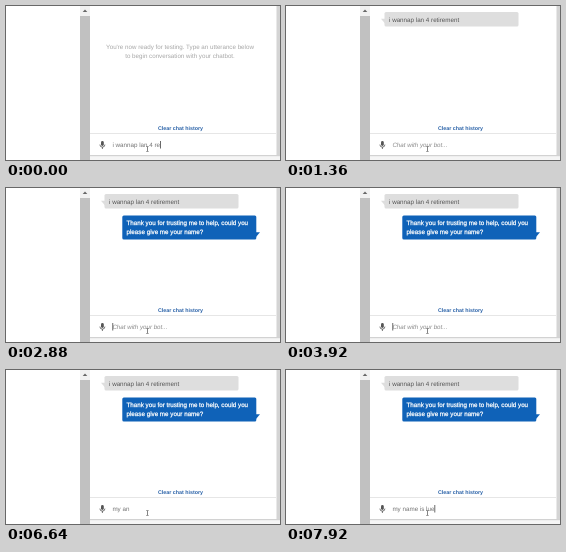
These frames come from a looping animation (274 px wide and 154 px high, 8000 ms). An HTML page with a canvas:

```html
<!DOCTYPE html>
<html lang="en">
<head>
<meta charset="utf-8">
<title>Chat test panel</title>
<style>
html, body { margin: 0; width: 100%; height: 100%; overflow: hidden; background: #fff; }
canvas { display: block; width: 274px; height: 154px; }
</style>
</head>
<body>
<canvas id="stage"></canvas>
<script>
const W = 274, H = 154, LOOP = 8000;
const canvas = document.getElementById('stage');
const ctx = canvas.getContext('2d');
const dpr = window.devicePixelRatio || 1;
canvas.width = W * dpr;
canvas.height = H * dpr;

const FAMILY = '"Liberation Sans", Arial, sans-serif';
const HINT = 'Chat with your bot...';
const FIRST = 'i wannap lan 4 retirement';
const LEFT = 106.4;

// [time, text in the input]; an empty string shows the hint
const typing = [
  [0, 'i wannap lan 4 re'], [320, 'i wannap lan 4 ret'],
  [400, 'i wannap lan 4 retir'], [480, 'i wannap lan 4 retire'],
  [640, 'i wannap lan 4 retirem'], [720, 'i wannap lan 4 retireme'],
  [800, 'i wannap lan 4 retiremen'], [880, FIRST], [1200, ''],
  [5840, 'm'], [5920, 'my'], [6000, 'my '], [6080, 'my a'], [6160, 'my an'],
  [6800, 'my a'], [6880, 'my '], [7040, 'my na'], [7200, 'my nam'],
  [7280, 'my name'], [7360, 'my name '], [7440, 'my name i'],
  [7600, 'my name is'], [7680, 'my name is l'],
  [7840, 'my name is lu'], [7920, 'my name is lue']
];

// [time, caret visible]
const blink = [
  [0, 1], [160, 0], [320, 1], [1200, 0], [1840, 1], [2400, 0], [2880, 1],
  [3440, 0], [3920, 1], [4320, 0], [4480, 1], [5520, 0], [5840, 1],
  [6640, 0], [6800, 1]
];

function at(list, t) {
  let value = list[0][1];
  for (const [start, v] of list) if (t >= start) value = v;
  return value;
}

function rect(x, y, w, h, color) {
  ctx.fillStyle = color;
  ctx.fillRect(x, y, w, h);
}

function poly(color, ...pts) {
  ctx.fillStyle = color;
  ctx.beginPath();
  pts.forEach(([x, y]) => ctx.lineTo(x, y));
  ctx.fill();
}

function text(str, x, y, color, { size = 6.26, style = '', align = 'left', weight = 0 } = {}) {
  ctx.font = `${style} ${size}px ${FAMILY}`;
  ctx.textRendering = 'geometricPrecision';
  ctx.textAlign = align;
  ctx.fillStyle = color;
  ctx.fillText(str, x, y);
  if (weight) {
    ctx.strokeStyle = color;
    ctx.lineWidth = weight;
    ctx.strokeText(str, x, y);
  }
  return ctx.measureText(str).width;
}

function bubble(x, y, w, h, color) {
  ctx.fillStyle = color;
  ctx.beginPath();
  ctx.roundRect(x, y, w, h, 1.5);
  ctx.fill();
}

function frame() {
  rect(0, 0, W, H, '#fff');
  // scrollbars
  rect(74, 0, 10, H, '#f1f1f1');
  rect(74, 10, 10, H - 10, '#c1c1c1');
  poly('#666', [76.7, 6], [79, 3.6], [81.3, 6]);
  rect(270.5, 0, 3.5, 150, '#d4d4d4');
  // input row borders
  rect(84, 127, 186, 1, '#e6e6e6');
  rect(84, 149, 190, 1.5, '#d2d2d2');
  rect(84, 150.5, 190, 3.5, '#f5f5f5');
}

function mic() {
  ctx.fillStyle = '#555';
  ctx.beginPath();
  ctx.roundRect(95, 135, 2.8, 5, 1.4);
  ctx.fill();
  ctx.strokeStyle = '#555';
  ctx.lineWidth = 0.8;
  ctx.beginPath();
  ctx.arc(96.4, 138.6, 2.5, 0, Math.PI);
  ctx.moveTo(96.4, 141);
  ctx.lineTo(96.4, 143);
  ctx.stroke();
}

function pointer() {
  rect(141, 140.5, 0.8, 5, '#666');
  rect(140, 140, 2.8, 0.6, '#777');
  rect(140, 145.3, 2.8, 0.6, '#777');
}

function intro() {
  const opt = { size: 6.22, align: 'center' };
  text("You're now ready for testing. Type an utterance below", 174, 43, '#a6a6a6', opt);
  text('to begin conversation with your chatbot.', 174, 51.8, '#a6a6a6', opt);
}

function question(alpha) {
  ctx.globalAlpha = alpha;
  bubble(98.5, 6, 134, 14.5, '#dedede');
  poly('#dedede', [95, 12.8], [99, 12.8], [99, 17.5]);
  text(FIRST, 103, 15.6, '#555');
  ctx.globalAlpha = 1;
}

function reply() {
  const blue = '#0f62b8';
  bubble(116.3, 27.5, 134, 24, blue);
  poly(blue, [250, 44.3], [254, 44.3], [250, 49]);
  text('Thank you for trusting me to help, could you', 120.5, 36.6, '#fff', { weight: 0.25 });
  text('please give me your name?', 120.5, 46, '#fff', { weight: 0.25 });
}

function draw(t) {
  ctx.setTransform(dpr, 0, 0, dpr, 0, 0);
  frame();
  if (t < 1200) intro();
  else question(Math.min(1, 0.4 + Math.floor((t - 1200) / 80) * 0.4));
  if (t >= 1760) reply();

  text('Clear chat history', 174.5, 124.2, '#2a62a8', { size: 5.33, style: 'bold', align: 'center' });
  mic();
  const typed = at(typing, t);
  let end = 0;
  if (typed) end = text(typed, LEFT, 141.1, '#737373');
  else text(HINT, LEFT, 141.1, '#8a8a8a', { size: 6.2, style: 'italic' });
  if (at(blink, t)) rect(LEFT + end, 135, 0.8, 7.5, '#444');
  pointer();
}

const begin = performance.now();
function tick() {
  draw((performance.now() - begin) % LOOP);
  requestAnimationFrame(tick);
}
tick();
</script>
</body>
</html>
```
